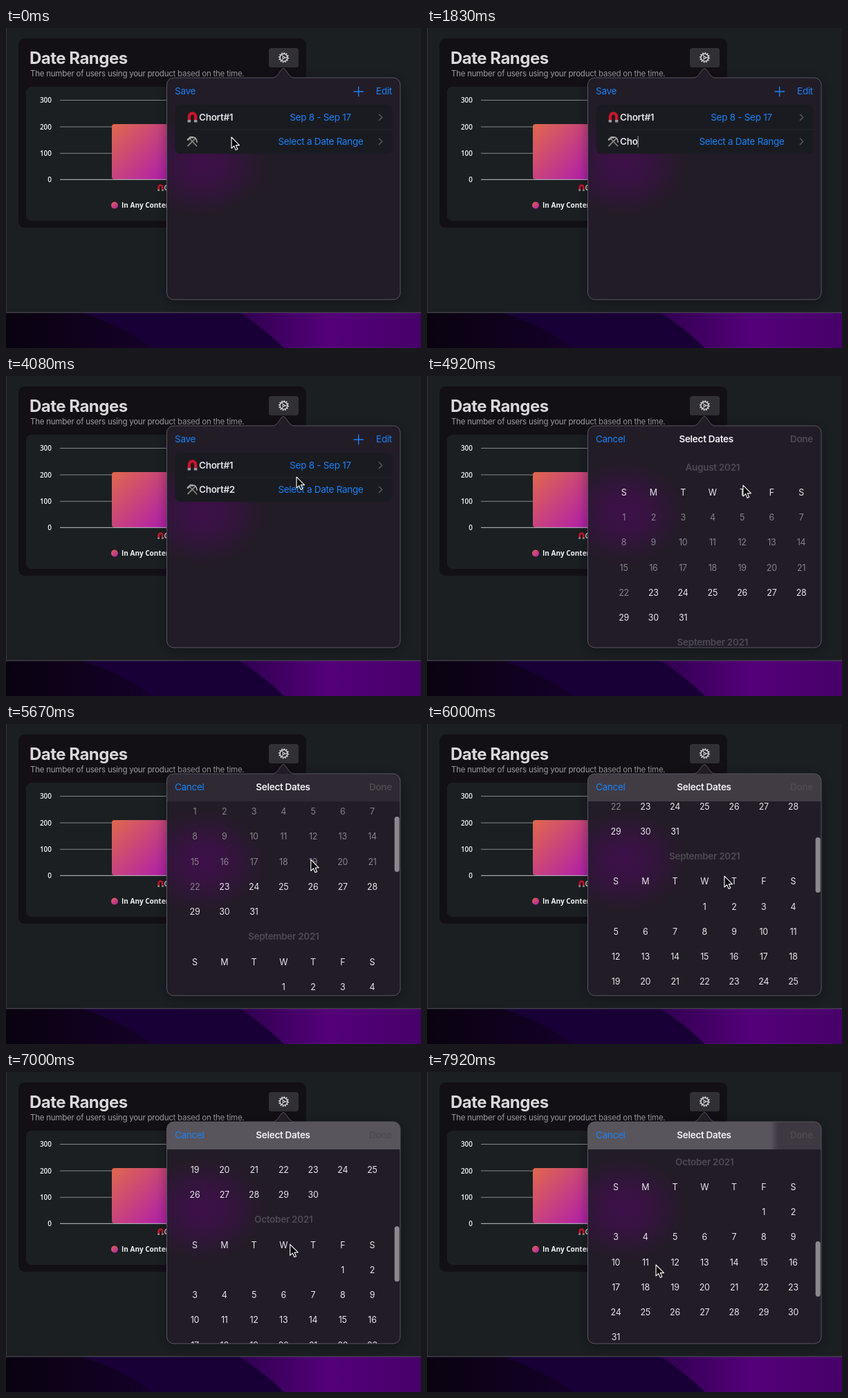
Write an HTML page that moves like this. It is 600 px wide and 463 px high and loops after 8000 ms.

```html
<!DOCTYPE html>
<html lang="en">
<head>
<meta charset="utf-8">
<title>Date Ranges</title>
<style>
html, body { margin: 0; width: 100%; height: 100%; overflow: hidden; background: #1b1f22; }
svg { display: block; width: 600px; height: 463px; }
text { font: 13.5px Inter, "Noto Sans", sans-serif; letter-spacing: -.021em; white-space: pre; }
.b { font-weight: 600; }
.blue { fill: #1a82f7; }
.mid text, .mid { text-anchor: middle; }
.day { font-size: 12.5px; fill: #e6e5e8; }
.past { fill: #858389; }
.month { font-weight: 600; fill: #4d4a51; }
.chart text { font: 600 10px "Open Sans", "Noto Sans", sans-serif; letter-spacing: 0; fill: #f2f2f2; }
.line { fill: none; stroke-linecap: round; stroke-linejoin: round; }
</style>
</head>
<body>
<svg viewBox="0 0 600 463">
  <defs>
    <linearGradient id="bar" gradientUnits="userSpaceOnUse" x1="153" y1="139" x2="233" y2="219">
      <stop stop-color="#e0684c"/><stop offset="1" stop-color="#b01dae"/>
    </linearGradient>
    <linearGradient id="dot" x2="1" y2="1">
      <stop stop-color="#e0684c"/><stop offset="1" stop-color="#b01dae"/>
    </linearGradient>
    <linearGradient id="night"><stop stop-color="#09030f"/><stop offset="1" stop-color="#150029"/></linearGradient>
    <linearGradient id="violet">
      <stop stop-color="#30004f"/><stop offset=".5" stop-color="#54007a"/><stop offset="1" stop-color="#470069"/>
    </linearGradient>
    <radialGradient id="glow" gradientUnits="userSpaceOnUse" cx="0" cy="0" r="1" gradientTransform="translate(285 198) scale(90 75)">
      <stop stop-color="#3d1049"/><stop offset=".35" stop-color="#3d1049" stop-opacity=".8"/>
      <stop offset="1" stop-color="#3d1049" stop-opacity="0"/>
    </radialGradient>
    <linearGradient id="shade">
      <stop offset=".785" stop-color="#fff"/>
      <stop id="shadeEnd" offset=".815" stop-color="#fff"/>
    </linearGradient>
    <filter id="shadow" x="-20%" y="-20%" width="140%" height="140%">
      <feDropShadow dx="0" dy="3" stdDeviation="10" flood-color="#000" flood-opacity=".35"/>
    </filter>
    <clipPath id="body"><rect x="232.5" y="72" width="337.5" height="321" rx="10"/></clipPath>
    <clipPath id="list"><path d="M233 112H570V393H233Z"/></clipPath>
    <g id="magnet" class="line" stroke-linecap="butt" stroke-width="4.4">
      <path d="M-4.6 7V-1A4.6 4.6 0 0 1 4.6 -1V7" stroke="#c9142c" style="stroke-linecap:butt"/>
      <path d="M-4.6 7.5V4M4.6 7.5V4" stroke="#9a9ba0" style="stroke-linecap:butt"/>
    </g>
  </defs>

  <rect width="600" height="463" fill="#1b1f22"/>
  <path d="M.5 0V411" stroke="#37393c"/>
  <g>
    <rect y="412" width="600" height="51" fill="#180036"/>
    <path d="M0 412H110Q170 432 212 463H0Z" fill="url(#night)"/>
    <path d="M338 412H600V463H402Q372 434 338 412Z" fill="url(#violet)"/>
    <path d="M0 411.8H600" stroke="#55535a"/>
  </g>

  <rect x="18" y="15" width="416" height="274" rx="9" fill="#131015"/>
  <text x="34" y="52" fill="#d9d8da" style="font-size:24px;font-weight:700">Date Ranges</text>
  <text x="35" y="69.5" fill="#9c9a9f" style="font-size:11.5px">The number of users using your product based on the time.</text>
  <rect x="380" y="29" width="43" height="28" rx="3.5" fill="#313034"/>
  <g transform="translate(401.5 42.8)" class="line" stroke="#e4e4e6">
    <circle r="5.4" stroke-width="1.3"/>
    <circle r="6.7" stroke-width="1.5" pathLength="24" stroke-dasharray="1 1" style="stroke-linecap:butt"/>
    <circle r="1.5"/>
    <path d="M1.5 0H5M-.8 -1.3L-2.5 -4.4M-.8 1.3L-2.5 4.4"/>
  </g>

  <g class="chart">
    <rect x="29" y="85" width="394" height="194" rx="8" fill="#1b1f22"/>
    <path d="M78 104.5H412M78 143H412M78 181.3H412" stroke="#86888a"/>
    <rect x="153" y="139" width="188" height="80" rx="4" fill="url(#bar)"/>
    <path d="M78 219.3H412" stroke="#c4c5c6"/>
    <g text-anchor="end">
      <text x="66" y="108">300</text><text x="66" y="146.5">200</text>
      <text x="66" y="185">100</text><text x="66" y="223">0</text>
    </g>
    <use href="#magnet" transform="translate(223.5 231) scale(.62)"/>
    <text x="228.5" y="235">Chort#1</text>
    <circle cx="157" cy="256.5" r="5" fill="url(#dot)"/>
    <text x="167" y="260.3" style="font-weight:700">In Any Content</text>
  </g>

  <path id="pop" d="M242.5 72H386C393 72 397 58.5 401 58.5S409 72 416 72H560A10 10 0 0 1 570 82V383A10 10 0 0 1 560 393H242.5A10 10 0 0 1 232.5 383V82A10 10 0 0 1 242.5 72Z" fill="#241f28" filter="url(#shadow)"/>
  <g clip-path="url(#body)">
    <rect x="232" y="72" width="338" height="321" fill="url(#glow)"/>

    <g id="ranges">
      <rect x="244.500" y="111" width="314.500" height="71" rx="8" fill="#1a1b20"/>
      <path d="M261 146.800H559" stroke="#26252b"/>
      <use href="#magnet" x="269.500" y="129"/>
      <g transform="translate(269.500 164)" class="line">
        <path d="M-6.500 6.500L4 -4M6 6.500L-3.500 -3.500" stroke="#85807c" stroke-width="1.800"/>
        <path d="M-6.500 -2.500L-2.500 -6L0 -5.500" stroke="#a5a5a8" stroke-width="2.800"/>
        <path d="M-1 -6Q6 -7 6.500 1" stroke="#b0b0b3" stroke-width="1.700"/>
      </g>
      <text x="279" y="134" class="b" fill="#e2e1e4">Chort#1</text>
      <text id="typed" x="279" y="169" class="b" fill="#e2e1e4"></text>
      <path id="caret" d="M0 156.500V173" stroke="#a9a8ac"/>
      <g class="mid">
        <text x="454.500" y="134" class="blue">Sep 8 - Sep 17</text>
        <text x="455" y="169" class="blue">Select a Date Range</text>
      </g>
      <path d="M539.500 125L543.800 129.200L539.500 133.400M539.500 160L543.800 164.200L539.500 168.400" class="line" stroke="#56555a" stroke-width="1.500"/>
    </g>
    <g id="rangesBar">
      <text x="244" y="96.300" class="blue">Save</text>
      <path d="M502.500 92H517M509.700 84.800V99.200" stroke="#1a82f7" stroke-width="1.400"/>
      <text x="558" y="96.300" text-anchor="end" class="blue">Edit</text>
    </g>

    <g clip-path="url(#list)"><g id="calendar" class="mid"></g></g>
    <rect id="header" x="232" y="72" width="338" height="40" fill="url(#shade)"/>
    <g id="calendarBar">
      <text x="244" y="96.300" class="blue">Cancel</text>
      <text id="heading" x="400.500" y="96.300" class="b mid" fill="#f1f0f3">Select Dates</text>
      <text x="558" y="96.300" text-anchor="end" class="b" fill="#4d4a50">Done</text>
    </g>
    <rect id="thumb" x="561.700" width="7" height="80" rx="3.500" fill="#8b898e"/>
  </g>
  <use href="#pop" style="display:none"/>
  <path d="M242.500 72H386C393 72 397 58.500 401 58.500S409 72 416 72H560A10 10 0 0 1 570 82V383A10 10 0 0 1 560 393H242.500A10 10 0 0 1 232.500 383V82A10 10 0 0 1 242.500 72Z" fill="none" stroke="#59565d"/>
  <path id="pointer" d="M0 0V16L3.700 12.600L6.200 18.400L8.800 17.300L6.300 11.600H11.500Z" fill="#050505" stroke="#fff" stroke-width="1.100" stroke-linejoin="round"/>
</svg>
<script>
const $ = id => document.getElementById(id);
const LOOP = 8000, ROW = 36.25, PUSH = 4550, WIDTH = 338;
const clamp = v => Math.max(0, Math.min(1, v));

// name, weekday of the 1st, days, first selectable day
const months = [["August", 0, 31, 23], ["September", 3, 30, 1], ["October", 5, 31, 1]];
let y = 132, markup = "";
const put = (cls, col, y, s) =>
  markup += `<text class="${cls}" x="${273 + col * 42.75}" y="${y + 4.5}">${s}</text>`;
for (const [name, first, days, open] of months) {
  put("month", 3, y, name + " 2021");
  [..."SMTWTFS"].forEach((s, i) => put("day", i, y + ROW, s));
  for (let d = 1; d <= days; d++) {
    const cell = first + d - 1;
    put(d < open ? "day past" : "day", cell % 7, y + ROW * (2 + Math.floor(cell / 7)), d);
  }
  y += ROW * (2 + Math.ceil((first + days) / 7));
}
$("calendar").innerHTML = markup;

const pointerKeys = [[0, 326, 158], [3450, 326, 158], [4080, 420, 146], [4400, 438, 160],
  [4920, 457, 158], [5330, 452, 172], [6000, 430, 220], [6900, 418, 236], [7000, 411, 249],
  [7080, 384, 278], [7330, 338, 316], [7500, 332, 312], [7920, 331, 279], [8000, 331, 279]];
const scrollKeys = [[5450, 0], [6000, 194], [6250, 250], [7000, 425.5], [7080, 430],
  [7480, 430], [7900, 509.5]];
const keyTimes = [1300, 1530, 1760, 2050, 2280, 2700, 3000];

function at(keys, t, i = 1) {
  if (t <= keys[0][0]) return keys[0][i];
  const n = keys.findIndex(k => k[0] > t);
  if (n < 0) return keys.at(-1)[i];
  const a = keys[n - 1], b = keys[n];
  return a[i] + (b[i] - a[i]) * (t - a[0]) / (b[0] - a[0]);
}

const move = (id, x, y) => $(id).setAttribute("transform", `translate(${x} ${y})`);
const fade = (id, v) => $(id).setAttribute("opacity", v);

function draw(t) {
  const text = "Chort#2".slice(0, keyTimes.filter(k => k <= t).length);
  if ($("typed").textContent !== text) $("typed").textContent = text;
  move("caret", 279.5 + (text ? $("typed").getComputedTextLength() : 0), 0);
  fade("caret", t > 700 && t < 3500 ? 1 : 0);

  // critically damped slide between the two screens
  const s = Math.max(0, t - PUSH) * .014, rest = (1 + s) * Math.exp(-s), done = 1 - rest;
  const scroll = at(scrollKeys, t);
  move("ranges", -.3 * WIDTH * done, 0);
  fade("ranges", clamp(1 - done * 1.1));
  fade("rangesBar", clamp(1 - done * 1.5));
  move("calendar", WIDTH * rest, -scroll);
  move("heading", .27 * WIDTH * rest, 0);
  fade("calendarBar", clamp(done * 1.1));

  const tint = Math.min(.25, scroll * .00072);
  fade("header", tint);
  $("shadeEnd").setAttribute("stop-opacity", 1 - .5 * clamp((t - 7600) / 200));
  $("thumb").setAttribute("y", 114 + scroll * .257);
  fade("thumb", clamp((t - 5450) / 150));

  move("pointer", at(pointerKeys, t), at(pointerKeys, t, 2));
  fade("pointer", t >= 1300 && t < 3450 ? 0 : 1);
}

const start = performance.now();
function tick() {
  draw((performance.now() - start) % LOOP);
  requestAnimationFrame(tick);
}
tick();
</script>
</body>
</html>
```
